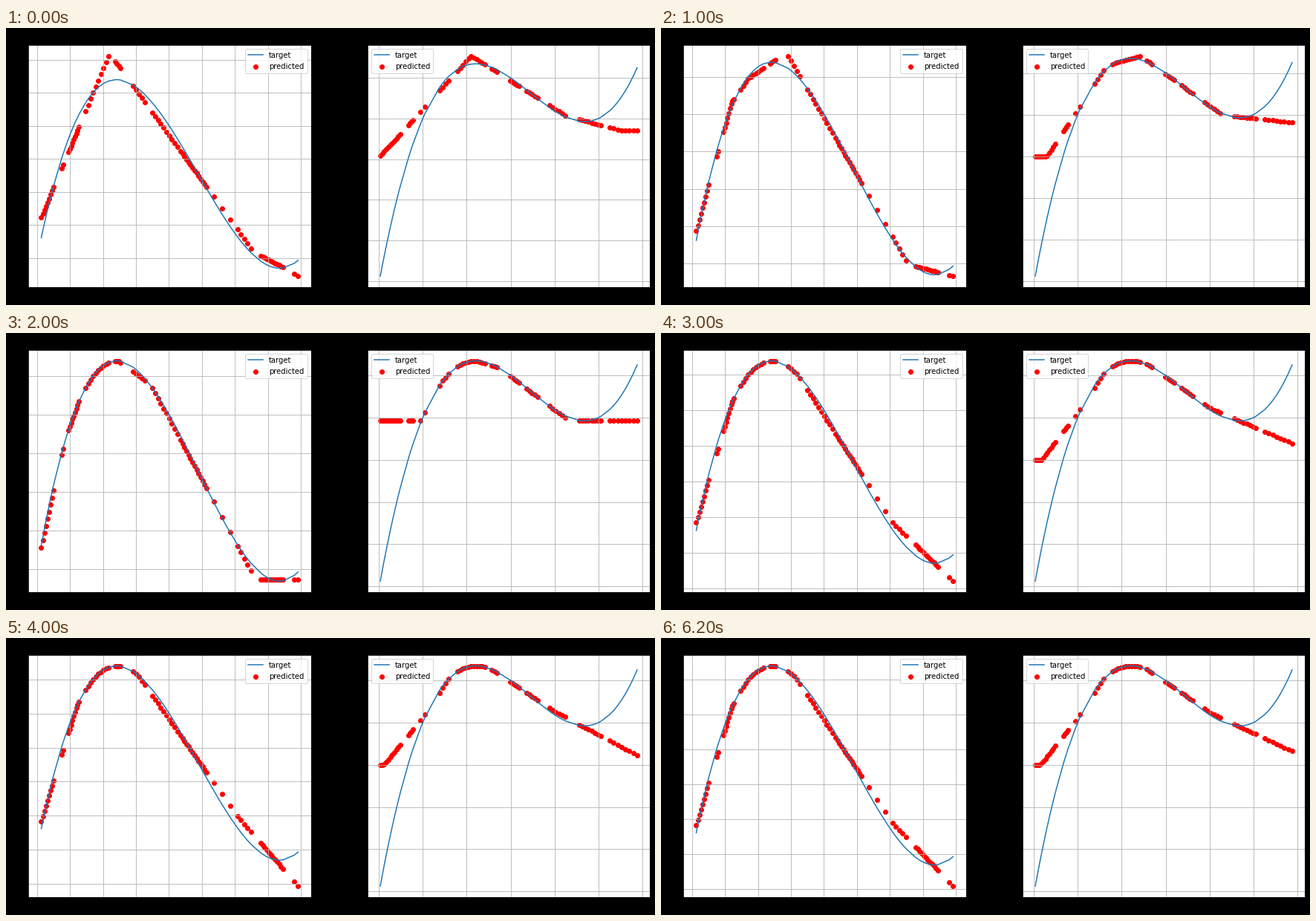
Animation of 874x373 px, one loop 7000 ms. Source, as a matplotlib script:

```python
import matplotlib.pyplot as plt
import numpy as np
from matplotlib.animation import FuncAnimation
from matplotlib.ticker import MultipleLocator

W, H, DPI = 874, 373, 72
LEFT, TOP, WIDTH, HEIGHT = 30.2, 22.7, 380.45, 326.2
MARGIN = 0.05


def target(x):
    return 0.471 * x**3 - 1.25 * x**2 - 7.53 * x + 0.05


def clusters(*runs):
    """Evenly spaced samples in runs of (start, end, count)."""
    return np.concatenate([np.linspace(*run) for run in runs])


def follow(start, end):
    """Bends that lie on the target curve."""
    return [(x, target(x)) for x in np.linspace(start, end, 9)]


def settled(t):
    """Late fits share one shape whose ends drift with t."""
    return [(-5.65 - 0.12 * t, -40), (-3.95, -17),
            *follow(-2.8, -0.8 - 0.15 * t),
            (2.1, -15.9 + 0.7 * t), (5.75, -32.2 - 3.3 * t)]


# The bends of the piecewise linear fit at each epoch; both panels show it
EPOCHS = [
    [(-5.93, -38.4), (-1.8, 10.92), (2.58, -19.1), (3.39, -21.2), (5.08, -26)],
    [(-5.39, -40), (-2.8, 1.6), (-2.29, 4.8), (-1.15, 8.28), (2.56, -20.1),
     (5.75, -23.8)],
    [(-4.09, -21.3), (-3.14, -3.06), *follow(-2.74, -1.55), (-0.55, 3.9),
     (2.63, -21.3)],
    settled(0),
    settled(1),
    settled(0.4),
]


def padded(values):
    lo, hi = np.min(values), np.max(values)
    pad = MARGIN * (hi - lo)
    return lo - pad, hi + pad


class Panel:
    def __init__(self, fig, left, xs, x_tick, y_tick, loc):
        self.xs, self.ys = xs, target(xs)
        self.ax = fig.add_axes([left / W, 1 - (TOP + HEIGHT) / H,
                                WIDTH / W, HEIGHT / H])
        self.line, = self.ax.plot(xs, self.ys, label="target")
        self.dots = self.ax.scatter(xs, self.ys, color="red",
                                    label="predicted")
        self.ax.set_xlim(padded(xs))
        self.ax.xaxis.set_major_locator(MultipleLocator(x_tick))
        self.ax.yaxis.set_major_locator(MultipleLocator(y_tick))
        self.ax.tick_params(length=0, labelleft=False, labelbottom=False)
        self.ax.grid(True)
        self.ax.legend(loc=loc)

    def show(self, bends):
        fit = np.interp(self.xs, *np.transpose(bends))
        self.dots.set_offsets(np.column_stack([self.xs, fit]))
        self.ax.set_ylim(padded([fit, self.ys]))


near = clusters(
    (-3.873, -3.49, 9), (-3.25, -3.21, 2), (-3.05, -2.73, 9),
    (-2.53, -1.83, 10), (-1.63, -1.47, 4), (-1.09, -0.73, 5),
    (-0.5, 0.26, 10), (0.35, 1.14, 14), (1.36, 1.86, 3),
    (2.08, 2.49, 5), (2.78, 3.46, 12), (3.8, 3.917, 2))
wide = clusters(
    (-5.931, -5.02, 11), (-4.65, -4.45, 4), (-4.11, -3.9, 2),
    (-3.23, -2.82, 4), (-2.42, -1.17, 11), (-0.86, -0.63, 3),
    (-0.02, 0.39, 5), (0.72, 1.23, 5), (1.77, 2.48, 6),
    (3.12, 4.1, 8), (4.51, 5.753, 8))

fig = plt.figure(figsize=(W / DPI, H / DPI), dpi=DPI, facecolor="black")
panels = [
    Panel(fig, LEFT, near, 1, 5, "upper right"),
    Panel(fig, LEFT + 1.2 * WIDTH, wide, 2, 20, "upper left"),
]


def draw(i):
    # the last epoch is held for two seconds
    bends = EPOCHS[min(i, len(EPOCHS) - 1)]
    for panel in panels:
        panel.show(bends)
    return []


anim = FuncAnimation(fig, draw, frames=7, interval=1000, repeat=True)
plt.show()
```
